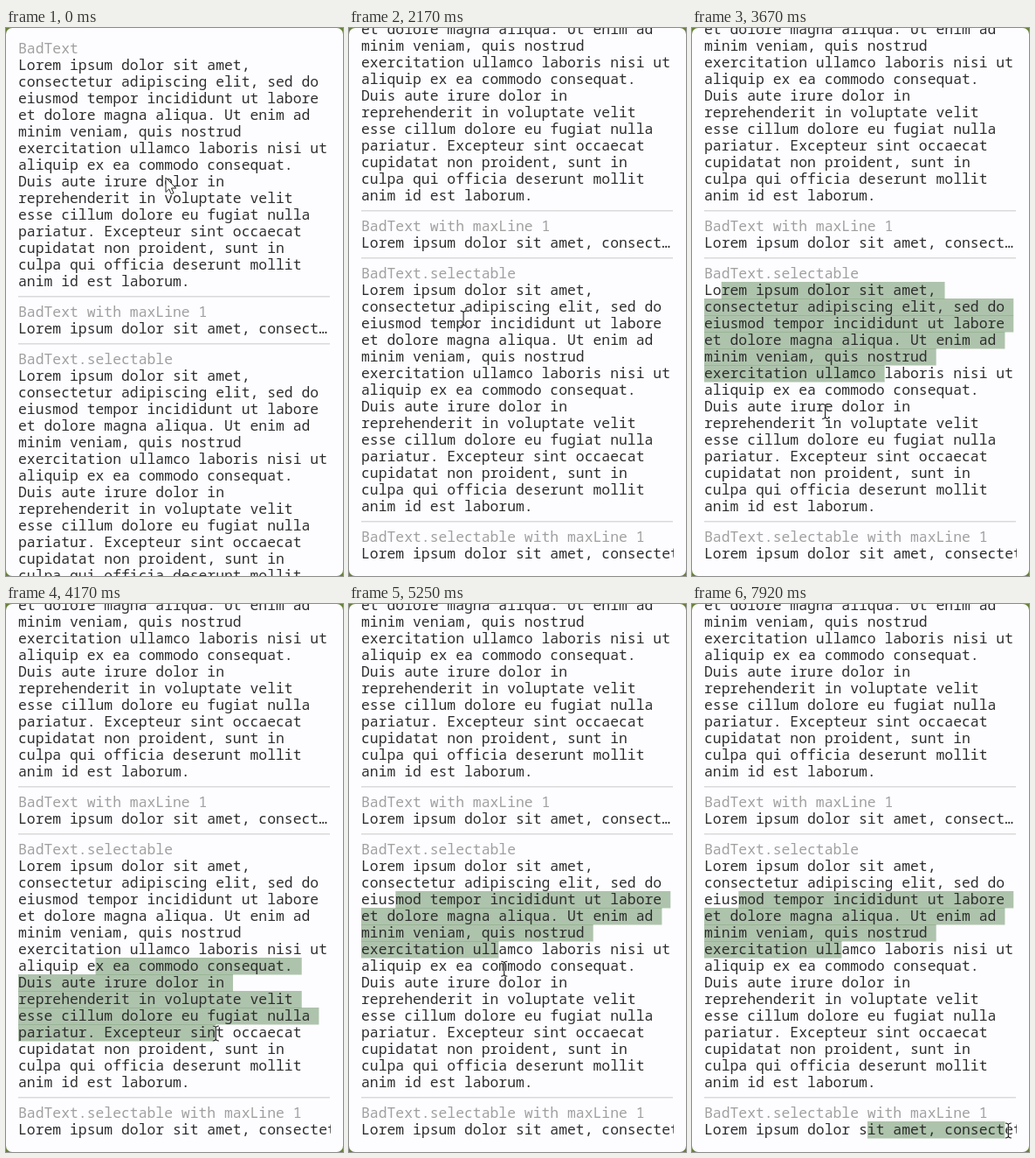
Recreate the animation shown at these times as an HTML page. Size 386 by 626 pixels, loop 8 s.

```html
<!DOCTYPE html>
<html lang="en">
<head>
<meta charset="utf-8">
<title>Selectable text</title>
<style>
  html, body { margin: 0; width: 100%; height: 100%; overflow: hidden; background: #647f38; }
  svg { display: block; width: 386px; height: 626px; }
  text { font: 300 16.4px "Noto Sans Mono", "DejaVu Sans Mono", monospace; fill: #2e2e2e; }
  .title { fill: #a0a0a0; }
  .rule { stroke: #dadada; stroke-width: 1.4; }
  .sel { fill: #618c5a; fill-opacity: .5; }
</style>
</head>
<body>
<svg viewBox="0 0 386 626">
  <defs>
    <clipPath id="card"><rect width="386" height="626" rx="7"/></clipPath>
    <clipPath id="column"><rect x="14" width="358" height="800"/></clipPath>
    <path id="caret" d="M-3.5 -8.5Q0 -8.5 0 -6V6Q0 8.5 -3.5 8.5M3.5 -8.5Q0 -8.5 0 -6M0 6Q0 8.5 3.5 8.5"/>
  </defs>
  <g clip-path="url(#card)">
    <rect width="386" height="626" fill="#fdfcff"/>
    <g id="page">
      <g id="marks"></g>
      <g id="copy" clip-path="url(#column)"></g>
    </g>
    <rect id="thumb" x="378" y="83" width="8" height="543" fill="#dedede"/>
  </g>
  <path id="arrow" d="M0 0V16.5L3.8 13L6.3 18.8L9 17.6L6.5 12H11.8Z" fill="#fff" stroke="#222" stroke-linejoin="round"/>
  <g id="beam" fill="none">
    <use href="#caret" stroke="#fff" stroke-width="2.2" opacity=".7"/>
    <use href="#caret" stroke="#1c1c1c" stroke-width="1.1"/>
  </g>
</svg>
<script>
const LOOP = 8000, STEP = 1000 / 12;
const LEFT = 14, CHAR = 9.84, LINE = 19, SCROLL = 98, BOW = -0.28;

const lorem = [
  'Lorem ipsum dolor sit amet,',
  'consectetur adipiscing elit, sed do',
  'eiusmod tempor incididunt ut labore',
  'et dolore magna aliqua. Ut enim ad',
  'minim veniam, quis nostrud',
  'exercitation ullamco laboris nisi ut',
  'aliquip ex ea commodo consequat.',
  'Duis aute irure dolor in',
  'reprehenderit in voluptate velit',
  'esse cillum dolore eu fugiat nulla',
  'pariatur. Excepteur sint occaecat',
  'cupidatat non proident, sunt in',
  'culpa qui officia deserunt mollit',
  'anim id est laborum.'
];
const article = { lines: lorem, top: 290 };
const single = { lines: ['Lorem ipsum dolor sit amet, consectetur'], top: 591 };

const $ = id => document.getElementById(id);
const clamp = (v, lo, hi) => Math.min(hi, Math.max(lo, v));
const ramp = (t, a, b) => clamp((t - a) / (b - a), 0, 1);
const ease = k => k * k * (3 - 2 * k);

function add(parent, tag, attrs, text) {
  const el = document.createElementNS('http://www.w3.org/2000/svg', tag);
  for (const k in attrs) el.setAttribute(k, attrs[k]);
  if (text) el.textContent = text;
  parent.appendChild(el);
  return el;
}

// The pointer's journey: legs with rests between them
const legs = [];
let now = 0, here = [183, 171];

const rest = until => { now = until; };
function go(end, to, bow = 0, block = null) {
  legs.push({ start: now, end, from: here, to, bow, block });
  now = end;
  here = to;
}
const spot = (block, row, col) => [LEFT + col * CHAR, block.top + (row + 0.55) * LINE];
const drag = (end, block, row, col) => go(end, spot(block, row, col), 0, block);

rest(250);
go(500, [130, 266]);
go(1083, [100, 256]);
go(1500, [12, 342]);
rest(1583);
go(2300, [143, 342], BOW);
rest(2417);
go(2750, spot(article, 0, 2));
rest(2830);
drag(3250, article, 5, 21);
rest(3400);
go(3860, spot(article, 6, 9), BOW);
drag(4167, article, 10, 23);
go(4917, spot(article, 2, 4));
drag(5000, article, 5, 16);
rest(5083);
go(6083, [78, 600], BOW);
rest(6250);
go(6500, spot(single, 0, 1.8));
rest(6670);
drag(7500, single, 0, 19);
drag(7917, single, 0, 35.4);

function pointer(t) {
  const leg = legs.filter(l => l.start <= t).pop() || legs[0];
  const k = ease(ramp(t, leg.start, leg.end));
  const [x, y] = leg.from, dx = leg.to[0] - x, dy = leg.to[1] - y;
  const side = leg.bow * Math.sin(Math.PI * k);
  return [x + dx * k - dy * side, y + dy * k + dx * side];
}

function caret({ lines, top }, [x, y]) {
  const row = clamp(Math.floor((y - top) / LINE), 0, lines.length - 1);
  const col = clamp(Math.round((x - LEFT) / CHAR), 0, lines[row].length);
  return { row, col };
}

function select(block, t) {
  const leg = legs.filter(l => l.block === block && l.start <= t).pop();
  const from = leg && caret(block, leg.from);
  const to = leg && caret(block, t < leg.end ? pointer(t) : leg.to);
  block.rects.forEach((rect, i) => {
    let a = 0, b = 0;
    if (leg && i >= from.row && i <= to.row) {
      a = i === from.row ? from.col : 0;
      b = i === to.row ? to.col : block.lines[i].length + 1;
    }
    rect.setAttribute('x', LEFT + a * CHAR);
    rect.setAttribute('width', Math.max(0, b - a) * CHAR);
  });
}

function build() {
  let y = 14;
  const line = (text, cls = '') => {
    add($('copy'), 'text', { x: LEFT, y: y + 15, class: cls }, text);
    y += LINE;
  };
  const section = (title, lines) => {
    if (y > 14) {
      add($('copy'), 'line', { x1: LEFT, x2: 371, y1: y + 7.7, y2: y + 7.7, class: 'rule' });
      y += 16;
    }
    line(title, 'title');
    lines.forEach(s => line(s));
  };
  section('BadText', lorem);
  section('BadText with maxLine 1', ['Lorem ipsum dolor sit amet, consect…']);
  section('BadText.selectable', lorem);
  section('BadText.selectable with maxLine 1', single.lines);
  for (const b of [article, single])
    b.rects = b.lines.map((_, i) =>
      add($('marks'), 'rect', { y: b.top + SCROLL + i * LINE, height: LINE + 0.5, class: 'sel' }));
}

function render(ms) {
  const t = Math.floor((ms % LOOP) / STEP + 0.06) * STEP;
  const [x, y] = pointer(t);
  const typing = t > 1240;
  $('page').setAttribute('transform', `translate(0 ${t > 160 ? -SCROLL : 0})`);
  $('thumb').setAttribute('opacity', ramp(t, 250, 420) * (1 - ramp(t, 800, 1080)));
  for (const id of ['arrow', 'beam']) {
    $(id).setAttribute('transform', `translate(${x} ${y})`);
    $(id).setAttribute('visibility', (id === 'beam') === typing ? 'visible' : 'hidden');
  }
  select(article, t);
  select(single, t);
}

build();
const start = performance.now();
(function tick() {
  render(performance.now() - start);
  requestAnimationFrame(tick);
})();
</script>
</body>
</html>
```
